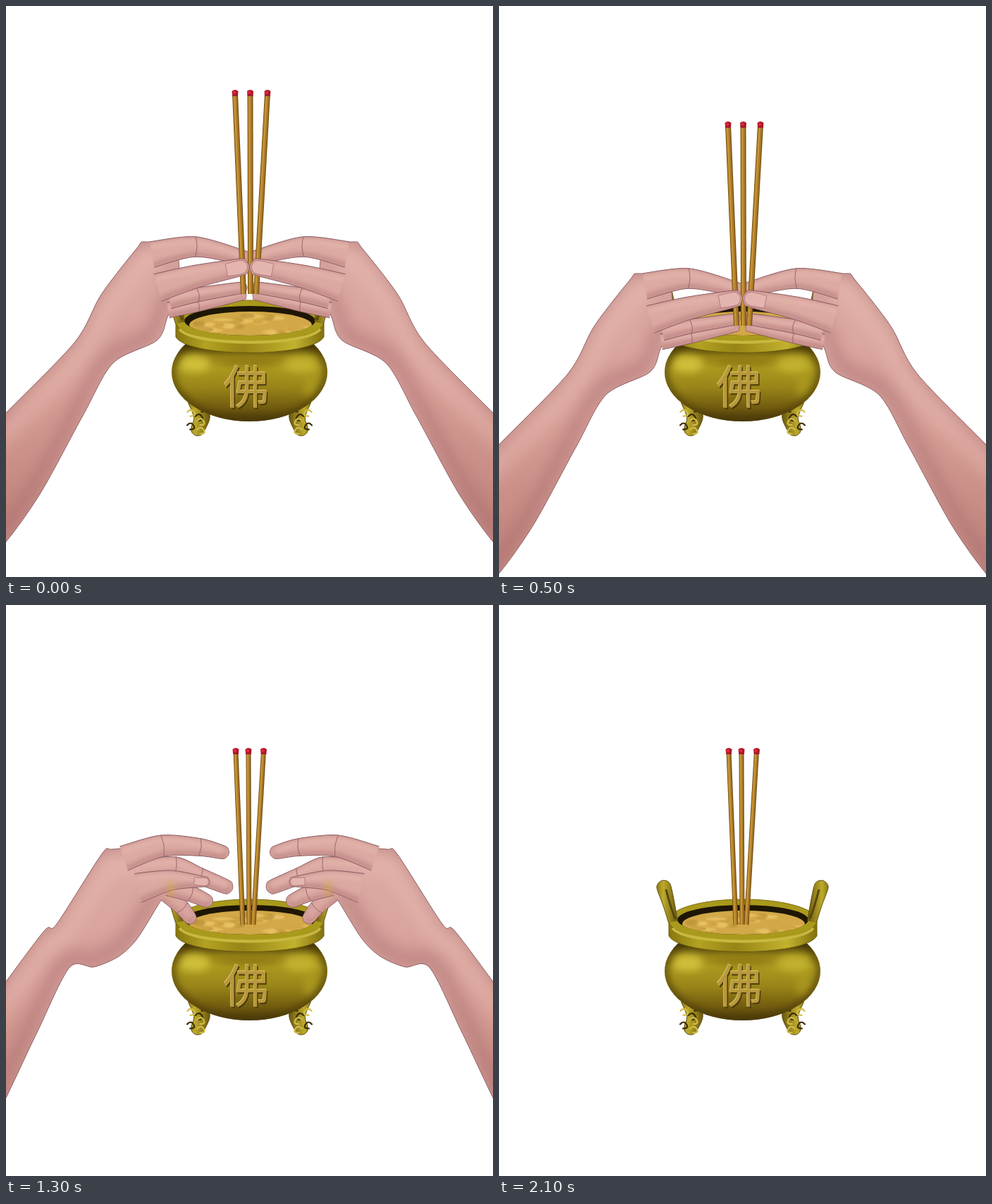
Recreate the animation shown at these times as an HTML page. Size 691 px wide and 811 px high, loop 2.2 s.

```html
<!DOCTYPE html>
<html lang="zh">
<head>
<meta charset="utf-8">
<style>
html, body { margin: 0; width: 100%; height: 100%; overflow: hidden; background: #fff; }
svg { display: block; width: 691px; height: 811px; }
.skin { fill: url(#skin); stroke: #805258; stroke-width: 1; stroke-linejoin: round; }
.line { fill: none; stroke: #96636a; stroke-linecap: round; }
.nail { fill: #e3b5ae; stroke: #a87278; stroke-width: .8; }
.gold { fill: url(#metal); stroke: #5d4c0c; }
.glyph { font: 400 65px "Noto Sans CJK SC", "Noto Sans CJK", "Noto Sans CJK JP", sans-serif; text-anchor: middle; }
</style>
</head>
<body>
<svg viewBox="0 0 691 811">
  <defs>
    <linearGradient id="skin" gradientUnits="userSpaceOnUse" x1="100" y1="380" x2="110" y2="730">
      <stop offset="0" stop-color="#dcaaa2"/><stop offset=".45" stop-color="#d7a098"/><stop offset="1" stop-color="#c0837b"/>
    </linearGradient>
    <linearGradient id="bodyV" x2="0" y2="1">
      <stop offset=".22" stop-color="#3f3207"/><stop offset=".34" stop-color="#958217"/>
      <stop offset=".45" stop-color="#ac9a20"/><stop offset=".65" stop-color="#988418"/>
      <stop offset=".85" stop-color="#715b0f"/><stop offset="1" stop-color="#45340a"/>
    </linearGradient>
    <linearGradient id="rim">
      <stop offset="0" stop-color="#87770f"/><stop offset=".2" stop-color="#b3a222"/>
      <stop offset=".45" stop-color="#978416"/><stop offset=".8" stop-color="#c3b22e"/><stop offset="1" stop-color="#82710f"/>
    </linearGradient>
    <linearGradient id="metal">
      <stop offset="0" stop-color="#8c7a12"/><stop offset=".3" stop-color="#bdab2c"/><stop offset="1" stop-color="#6b580e"/>
    </linearGradient>
    <linearGradient id="peach" x2="0" y2="1">
      <stop offset="0" stop-color="#c9995e"/><stop offset=".5" stop-color="#d3a07c"/><stop offset=".85" stop-color="#d3999a"/>
      <stop offset=".86" stop-color="#d3999a" stop-opacity="0"/>
    </linearGradient>
    <clipPath id="bowl"><ellipse cx="346" cy="447" rx="93" ry="21"/></clipPath>
    <clipPath id="heap"><ellipse cx="347" cy="453" rx="87" ry="19"/></clipPath>
    <clipPath id="belly"><ellipse cx="345.500" cy="520" rx="110.500" ry="70"/></clipPath>
  </defs>
  <g id="pot"></g>
  <g id="back"></g>
  <g id="sticks"></g>
  <g id="front"></g>
  <g id="stain"></g>
</svg>
<script>
const $ = id => document.getElementById(id);
const both = m => `<g>${m}</g><g transform="matrix(-1 0 0 1 691 0)">${m}</g>`;
const clipped = (id, m) => `<g clip-path="url(#${id})">${m}</g>`;
const blob = (x, y, rx, ry, c, o = 1) =>
  `<ellipse cx="${x}" cy="${y}" rx="${rx}" ry="${ry}" fill="${c}" opacity="${o}"/>`;
const points = text => text.split(' ').map(s => s.split(',').map(Number));

// Smooth path through a list of points
function curve(p) {
  let d = 'M' + p[0];
  for (let i = 0; i < p.length - 1; i++) {
    const a = p[i - 1] || p[i], b = p[i], c = p[i + 1], e = p[i + 2] || c;
    const ctl = (q, u, v) => q.map((n, k) => (n + (v[k] - u[k]) / 7).toFixed(1));
    d += `C${ctl(b, a, c)} ${ctl(c, e, b)} ${c}`;
  }
  return d;
}

// Tapered limb along its joints, open at the base and round at the tip
function limb(joints, w0, w1) {
  const last = joints.length - 1, left = [], right = [], creases = [];
  const polar = ([x, y], a, r) => [x + r * Math.cos(a), y + r * Math.sin(a)];
  joints.forEach((p, i) => {
    const a = joints[Math.max(0, i - 1)], b = joints[Math.min(last, i + 1)];
    const dir = Math.atan2(b[1] - a[1], b[0] - a[0]);
    const r = (w0 + (w1 - w0) * i / last) / 2;
    const turn = q => polar(p, dir + q * Math.PI / 4, r);
    left.push(turn(-2));
    right.unshift(turn(2));
    if (i === last) left.push(turn(-1), turn(0), turn(1));
    else if (i) creases.push([turn(-2), polar(p, dir, 2), turn(2)]);
  });
  return { d: curve([...left, ...right]), creases };
}

// Skin shape lit from above: dark lower rim, light upper rim
let count = 0;
function flesh(d, size) {
  const id = 'flesh' + count++;
  const rim = (c, x, y, o) => `<path d="${d}" fill="none" stroke="${c}" stroke-width="${size}" opacity="${o}"
    transform="translate(${x * size} ${y * size})" style="filter:blur(${size * .4}px)"/>`;
  return `<clipPath id="${id}"><path d="${d}"/></clipPath><path class="skin" d="${d}"/>` +
    clipped(id, rim('#ab6f72', -.25, -.3, .5) + rim('#edc2b9', .2, .8, .4));
}
function finger([text, w0, w1]) {
  const { d, creases } = limb(points(text), w0, w1);
  return flesh(d, 8) + creases.map(c => `<path class="line" d="${curve(c)}"/>`).join('');
}
function thumb([text, w0, w1]) {
  const joints = points(text), [a, b] = joints.slice(-2);
  const root = b.map((n, k) => n + (a[k] - n) * .32);
  return flesh(limb(joints, w0, w1).d, 8) +
    `<path class="nail" d="${limb([root, b], w1 * .75, w1 * .8).d}Z"/>`;
}

// Left hand: palm with arm, then digits as [joints, base width, tip width]
const poses = {
  clasp: {
    palm: '-40,620 0,578 98,477 135,410 185,345 197,335 240,345 245,400 229,442 214,475 152,507 110,580 50,690 0,761 -40,800',
    fingers: [['230,432 272,425 334,411', 22, 14], ['232,418 272,410 334,400', 24, 16], ['207,353 269,342 336,357', 37, 20]],
    thumb: ['215,400 270,384 333,371', 40, 24]
  },
  plant: {
    palm: '-40,580 0,548 128,451 165,412 200,373 218,361 250,380 270,415 257,447 225,475 168,496 120,555 40,652 0,692 -40,730',
    fingers: [['250,430 300,432 334,436', 28, 20], ['240,392 288,393 335,408', 22, 16], ['224,376 290,379 336,401', 29, 18]],
    thumb: ['235,428 290,421 334,415', 42, 24]
  },
  open: {
    palm: '-40,590 0,535 55,462 72,453 135,355 150,347 195,350 235,395 217,424 186,474 160,499 125,514 90,515 45,605 0,700 -40,779',
    fingers: [['228,410 250,430 261,444', 24, 18], ['230,400 262,410 284,420', 26, 19],
      ['190,377 240,371 275,385 312,400', 30, 20], ['167,360 222,342 275,344 307,351', 36, 19]],
    thumb: ['187,402 235,391 282,393', 42, 14]
  }
};
const layer = (name, m) => `<g data-pose="${name}">${both(`<g class="move">${m}</g>`)}</g>`;
for (const [name, p] of Object.entries(poses)) {
  $('back').innerHTML += layer(name, flesh(curve(points(p.palm)), 26) + p.fingers.map(finger).join(''));
  $('front').innerHTML += layer(name, thumb(p.thumb));
}

// Incense sticks: [top x, bottom x]
function bundle(id, pairs, top, bottom, w) {
  const stick = ([a, b]) => {
    const bar = (c, width, dx) =>
      `<path d="M${a + dx} ${top}L${b + dx} ${bottom}" stroke="${c}" stroke-width="${width}"/>`;
    return bar('#735019', w, 0) + bar('#aa7925', w - 2, -.3) + bar('#c9963a', 2, -1) +
      `<path d="M${a - 4.5} ${top - 3}q4.5-4 9 0l-.6 7h-7.6z" fill="#a9182a"/>` +
      `<circle cx="${a - 1}" cy="${top - 1}" r="2.4" fill="#dc2638"/>`;
  };
  return `<g id="${id}">${pairs.map(stick).join('')}</g>`;
}
$('sticks').innerHTML =
  bundle('held', [[325, 337], [346.5, 347], [371, 355]], 124, 409, 8) +
  bundle('stuck', [[326, 336], [344, 345], [365.5, 351]], 208, 454, 7);

const grip = limb([[247, 450], [241, 425], [234, 401]], 13, 20).d;

function pot() {
  let sand = '', curls = '';
  for (let i = 0; i < 42; i++) {
    const x = 268 + (i * 61.8) % 158, y = 438 + (i * 17.3) % 29;
    sand += blob(x, y, 7 + i % 5 * 2, 2 + i % 3, ['#e6c05f', '#b58f36', '#d5a945', '#efcb70'][i % 4], .7);
  }
  for (let i = 0; i < 7; i++) {
    const x = 271 + 9 * Math.sin(i * 2.2), y = 564 + i * 6.3;
    curls += `<path d="M${x - 5} ${y}q5-6 9 0t-5 6" stroke="${i % 2 ? '#3d2f08' : '#d0bc48'}"/>`;
  }
  const foot = `<path class="gold" d="${limb([[271, 560], [278, 584], [272, 601]], 26, 19).d}Z"/>
    <g fill="none" stroke-width="2.2" stroke-linecap="round">${curls}</g>`;
  const handle = `<path class="gold" d="${grip}"/>
    <path d="M237 404Q243 428 250 446" fill="none" stroke="#57460b" stroke-width="3"/>`;
  const glyph = (shift, c) => `<text class="glyph" x="${341 + shift}" y="${565 + shift}" fill="${c}">佛</text>`;
  return both(foot) +
    clipped('belly', `<rect x="230" y="450" width="231" height="142" fill="url(#bodyV)"/>
      <g style="filter:blur(6px)">
        ${blob(268, 508, 22, 12, '#d8c840', .85)}${blob(418, 508, 24, 12, '#cdbc34', .75)}
        ${blob(345, 506, 40, 7, '#85710f', .6)}${blob(432, 540, 10, 18, '#b3a022', .6)}
      </g>
      <ellipse cx="345.500" cy="520" rx="110" ry="70" fill="none" stroke="#4b3b08" stroke-width="10"
        opacity=".7" style="filter:blur(5px)"/>`) +
    glyph(1.5, '#4b3a0b') + glyph(-.8, '#dcc268') + glyph(0, '#b8983c') +
    `<path d="M241 450V470C258 500 434 500 451 470V450Z" fill="url(#rim)" stroke="#6d5b0c"/>
    <ellipse cx="346" cy="448" rx="105" ry="30" fill="#a99a1c" stroke="#7f6d10"/>
    <path d="M246 459C268 484 424 484 446 459" fill="none" stroke="#c8b840" stroke-width="4"/>
    <ellipse cx="346" cy="447" rx="93" ry="21" fill="#1e1605"/>` +
    clipped('bowl', clipped('heap', `<rect x="250" y="425" width="190" height="50" fill="#d2a848"/>
      <g style="filter:blur(1px)">${sand}</g>`)) +
    both(handle);
}
$('pot').innerHTML = pot();

$('stain').innerHTML =
  `<g id="tint" opacity=".3" style="filter:blur(3px)">${both(blob(234, 403, 6, 13, '#d8b52c'))}</g>` +
  `<g id="peel">${both(`<path d="${grip}" fill="url(#peach)"/>
    <path d="M234 401Q238 420 244 438" fill="none" stroke="#a87868" stroke-width="2"/>`)}</g>`;

const show = (el, on) => el.style.display = on ? '' : 'none';
const layers = [...document.querySelectorAll('[data-pose]')];

function draw(step) {
  const pose = step < 6 ? 'clasp' : step < 11 ? 'plant' : step < 16 ? 'open' : '';
  const sink = Math.min(0, (step - 9) * 3.6);
  const k = step - 13;
  const shift = { clasp: [0, 9 * step], plant: [0, sink + 3.6], open: [-8.5 * k, -3.5 * k] }[pose];
  for (const el of layers) {
    const on = el.dataset.pose === pose;
    show(el, on);
    if (on) el.querySelectorAll('.move').forEach(m => m.setAttribute('transform', `translate(${shift})`));
  }
  show($('held'), step < 6);
  show($('stuck'), step >= 6);
  $('held').setAttribute('transform', `translate(0 ${9 * step})`);
  $('stuck').setAttribute('transform', `translate(0 ${sink})`);
  show($('tint'), pose === 'open');
  show($('peel'), !pose);
  $('peel').style.opacity = Math.max(0, 1 - (step - 16) / 5);
}

const start = performance.now();
function tick() {
  draw(Math.floor((performance.now() - start) % 2200 / 100));
  requestAnimationFrame(tick);
}
tick();
</script>
</body>
</html>
```
